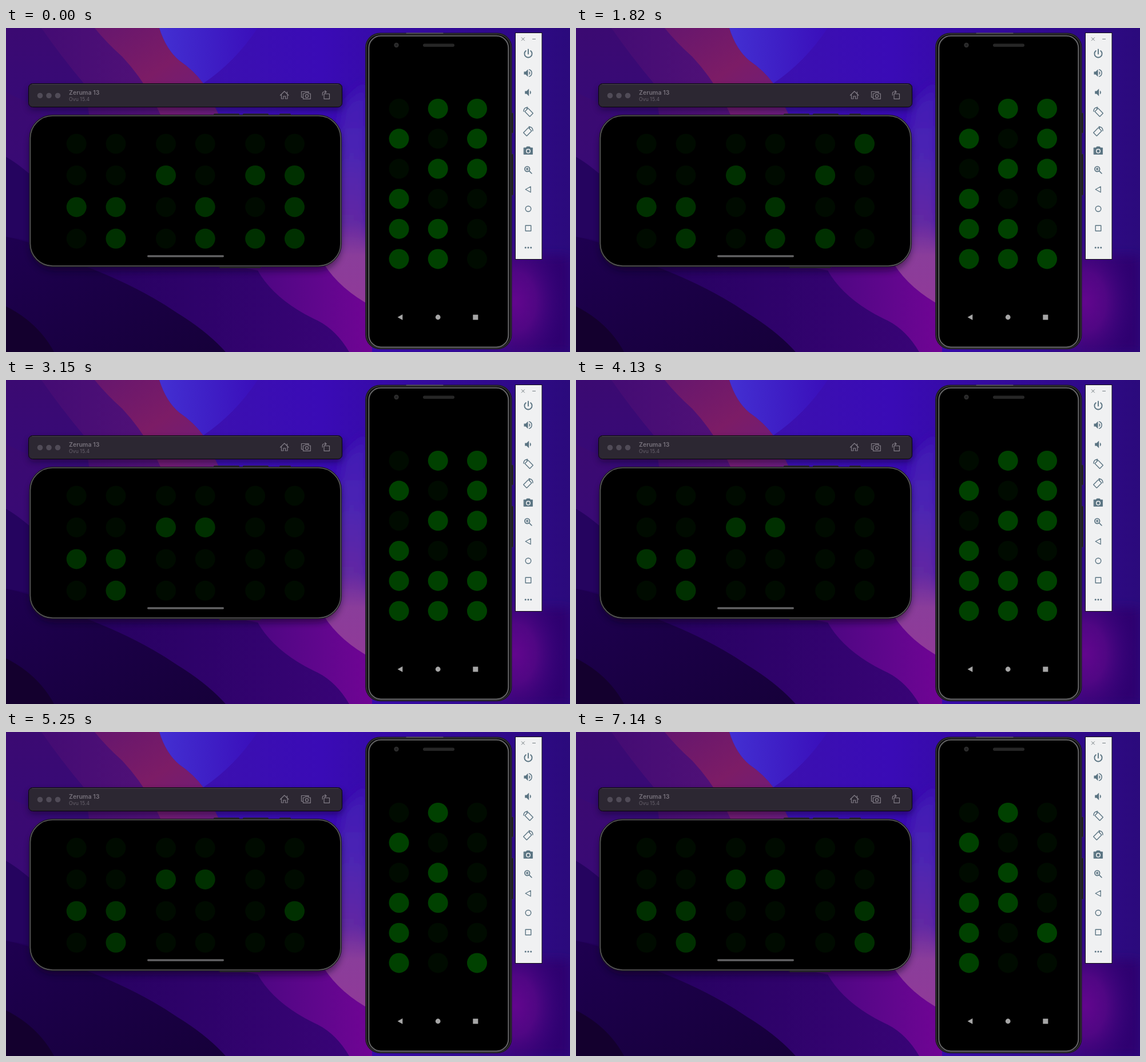
Recreate the animation shown at these times as an HTML page. Size 986 px wide and 568 px high, loop 7210 ms.

```html
<!DOCTYPE html>
<html lang="en">
<head>
<meta charset="utf-8">
<title>Binary clock on two phones</title>
<style>
  html, body { margin: 0; width: 100%; height: 100%; overflow: hidden; background: #21005a; }
  svg { display: block; width: 986px; height: 568px; }
  text { font-family: Inter, "Liberation Sans", sans-serif; }
  .line { fill: none; stroke-linecap: round; stroke-linejoin: round; }
</style>
</head>
<body>
<svg viewBox="0 0 986 568" xmlns="http://www.w3.org/2000/svg">
  <defs>
    <linearGradient id="sky">
      <stop offset="0" stop-color="#3a0a76"/>
      <stop offset=".3" stop-color="#3c12ae"/>
      <stop offset=".56" stop-color="#3a0bb6"/>
      <stop offset=".9" stop-color="#2f0988"/>
      <stop offset="1" stop-color="#2b0a7c"/>
    </linearGradient>
    <linearGradient id="plum">
      <stop offset="0" stop-color="#400a72"/>
      <stop offset="1" stop-color="#58147a"/>
    </linearGradient>
    <linearGradient id="rose" x1="0" y1="0" x2="1" y2="1">
      <stop offset="0" stop-color="#66166e"/>
      <stop offset=".5" stop-color="#7c1c66"/>
      <stop offset="1" stop-color="#6a1c80"/>
    </linearGradient>
    <linearGradient id="blue">
      <stop offset="0" stop-color="#4330d2"/>
      <stop offset="1" stop-color="#3a0eba"/>
    </linearGradient>
    <linearGradient id="left" x1="0" y1="0" x2="0" y2="1">
      <stop offset="0" stop-color="#3b0a72"/>
      <stop offset="1" stop-color="#360a78"/>
    </linearGradient>
    <linearGradient id="strip" x1="0" y1="0" x2="0" y2="1">
      <stop offset="0" stop-color="#3f16b4"/>
      <stop offset=".3" stop-color="#4a24b4"/>
      <stop offset=".65" stop-color="#6329a2"/>
      <stop offset="1" stop-color="#8c3f9a"/>
    </linearGradient>
    <linearGradient id="navy" x1="0" y1="0" x2="1" y2="1">
      <stop offset="0" stop-color="#1e0050"/>
      <stop offset="1" stop-color="#16003a"/>
    </linearGradient>
    <linearGradient id="low">
      <stop offset="0" stop-color="#21005a"/>
      <stop offset="1" stop-color="#3a0478"/>
    </linearGradient>
    <linearGradient id="magenta">
      <stop offset="0" stop-color="#42067c"/>
      <stop offset=".7" stop-color="#62068e"/>
      <stop offset="1" stop-color="#700494"/>
    </linearGradient>
    <linearGradient id="pink" x1="0" y1="0" x2="0" y2="1">
      <stop offset="0" stop-color="#7c359c" stop-opacity="0"/>
      <stop offset=".4" stop-color="#8a3d9a"/>
      <stop offset="1" stop-color="#903a98"/>
    </linearGradient>
    <radialGradient id="glow">
      <stop offset="0" stop-color="#62068e"/>
      <stop offset=".4" stop-color="#540786" stop-opacity=".9"/>
      <stop offset="1" stop-color="#34057a" stop-opacity="0"/>
    </radialGradient>
    <filter id="soft" x="-20%" y="-20%" width="140%" height="140%"><feGaussianBlur stdDeviation="9"/></filter>
    <filter id="shade" x="-20%" y="-40%" width="140%" height="180%"><feGaussianBlur stdDeviation="6"/></filter>
  </defs>

  <!-- wallpaper -->
  <rect width="986" height="568" fill="url(#sky)"/>
  <path d="M0 0H268L345 97L372 152V200H0Z" fill="url(#plum)"/>
  <path d="M0 0H62Q95 48 136 97L150 180H0Z" fill="url(#left)"/>
  <path d="M155 0H268Q280 38 303 57Q328 74 345 97L372 152H270Q245 95 203 50Q176 26 155 0Z" fill="url(#rose)"/>
  <path d="M268 0H440Q400 60 345 97Q328 74 303 57Q280 38 268 0Z" fill="url(#blue)"/>
  <path d="M0 112Q24 126 60 138V440H0Z" fill="url(#left)"/>
  <path d="M0 226Q22 238 60 272V440H0Z" fill="#25045f"/>
  <path d="M588 142Q606 112 632 96V480H540Z" fill="url(#strip)" filter="url(#soft)"/>
  <path d="M0 366Q80 376 150 418H640V568H0Z" fill="url(#low)"/>
  <path d="M372 412H640V568H600Q578 530 545 513Q470 478 440 425Z" fill="url(#magenta)"/>
  <path d="M540 340H640V488Q584 458 556 414Z" fill="url(#pink)"/>
  <path d="M880 400H986V568H880Z" fill="#2d0670" filter="url(#soft)"/>
  <ellipse cx="890" cy="480" rx="92" ry="130" fill="url(#glow)"/>
  <path d="M0 366Q70 380 134 416Q230 452 300 500Q352 532 384 568H0Z" fill="url(#navy)"/>
  <path d="M0 488Q56 516 84 568H0Z" fill="#14002e"/>

  <!-- landscape phone and its title bar -->
  <rect x="40" y="104" width="548" height="39" rx="8" fill="#08001c" opacity=".5" filter="url(#shade)"/>
  <rect x="42" y="162" width="544" height="264" rx="42" fill="#08001c" opacity=".5" filter="url(#shade)"/>
  <rect x="39.5" y="97.5" width="548" height="41" rx="7" fill="#2c2732" stroke="#08060c"/>
  <path d="M46 98.8H581" class="line" stroke="#48424e"/>
  <g fill="#504b57">
    <circle cx="59.5" cy="118.5" r="4.8"/><circle cx="75" cy="118.5" r="4.8"/><circle cx="90.5" cy="118.5" r="4.8"/>
  </g>
  <text x="110" y="117" font-size="10.6" font-weight="600" fill="#77727c">Zeruma 13</text>
  <text x="110" y="128.4" font-size="8.8" fill="#67626c">Ovu 15.4</text>
  <g class="line" stroke="#827d87" stroke-width="1.2">
    <path d="M479.5 118L486.7 111L494 118M481.5 117V124H485V119.5H488.5V124H492V117M491.5 112V115"/>
    <path d="M519 121.5H516.5V111.5H529V113.5M519.5 115H522L523.3 113.3H528L529.3 115H532.3V124.3H519.5Z"/>
    <circle cx="526" cy="119.3" r="2.6"/>
    <path d="M556 115.5H565.5V124.3H556ZM553.3 118V114.5Q553.3 112 556 112H560M557.5 109.8L560 112L557.5 114.2"/>
  </g>
  <g fill="#26252a">
    <rect x="363" y="150" width="45" height="4" rx="1.5"/><rect x="414" y="150" width="45" height="4" rx="1.5"/>
    <rect x="478" y="150" width="20" height="4" rx="1.5"/><rect x="373" y="417" width="72" height="4" rx="1.5"/>
  </g>
  <rect x="41.5" y="153" width="544.5" height="265" rx="40" fill="#000" stroke="#1c1b1d" stroke-width="2"/>
  <rect x="42.5" y="154" width="542.5" height="263" rx="39" fill="none" stroke="#58575a" stroke-width="1.6"/>
  <rect x="247" y="398.3" width="134" height="3.4" rx="1.7" fill="#626163"/>

  <!-- portrait phone -->
  <g fill="#1a191b" stroke="#39383b" stroke-width=".7">
    <rect x="882" y="149" width="4.5" height="35" rx="1"/><rect x="882" y="221" width="4.5" height="72" rx="1"/>
  </g>
  <rect x="628.8" y="9.2" width="255" height="553.3" rx="25" fill="#0a0a0b" stroke="#1e1e20" stroke-width="1.4"/>
  <rect x="630.2" y="10.6" width="252.2" height="550.5" rx="24" fill="none" stroke="#3c3c3e" stroke-width="1.2"/>
  <rect x="634.3" y="13.8" width="244" height="545.6" rx="21" fill="#000" stroke="#646466" stroke-width="2"/>
  <path d="M700 9H764" class="line" stroke="#68676b"/>
  <rect x="729" y="27.5" width="55" height="5.5" rx="2.7" fill="#262626"/>
  <circle cx="682.5" cy="30" r="4.2" fill="#2c2c2c"/><circle cx="682.5" cy="30" r="1.8" fill="#202022"/>
  <g fill="#a6a6a6">
    <path d="M684.5 507L693.3 502V512Z"/><circle cx="755.2" cy="507" r="4.4"/><rect x="816.3" y="502.6" width="9" height="9"/>
  </g>

  <!-- emulator controls -->
  <rect x="890.5" y="8.5" width="46.5" height="397" fill="#f0f1f2" stroke="#101014"/>
  <path d="M901.3 16.8l5.2 5.2m0-5.2l-5.2 5.2M920.6 19.4h5" class="line" stroke="#727b80"/>
  <g id="tools" class="line" stroke="#5a7482" stroke-width="1.5">
    <g><path d="M0-7.5V.5M-4.2-5A6.6 6.6 0 1 0 4.2-5" stroke-width="1.9"/></g>
    <g>
      <path d="M-7.5-2.4h3l4-4v12.8l-4-4h-3z" fill="#5a7482" stroke="none"/>
      <path d="M1.5-3.2a3.6 3.6 0 0 1 0 6.4z" fill="#5a7482" stroke="none"/>
      <path d="M1.8-6a6.3 6.3 0 0 1 0 12"/>
    </g>
    <g fill="#5a7482" stroke="none">
      <path d="M-5.8-2.4h3l4-4v12.8l-4-4h-3z"/><path d="M3-3.2a3.6 3.6 0 0 1 0 6.4z"/>
    </g>
    <g>
      <g id="turn" stroke-width="1.4">
        <rect x="-4.1" y="-6.2" width="8.2" height="12.4" rx=".5" transform="translate(1.2 1) rotate(-45)"/>
        <path d="M-8-.8Q-8-7.6-1.2-8M-1.2-8L-2.6-5.8"/>
      </g>
    </g>
    <g><use href="#turn" transform="scale(-1 1)"/></g>
    <g>
      <path d="M-7.6-5h3.6l1.5-2h5l1.5 2h3.6v11.5h-15.2z" fill="#5a7482" stroke-width=".8"/>
      <circle cy=".7" r="3.3" stroke="#f0f1f2" stroke-width="1.5"/>
    </g>
    <g><path d="M2.6-1.8A4.4 4.4 0 1 0-6.2-1.8A4.4 4.4 0 1 0 2.6-1.8M1.6 1.6L6 6M-3.7-1.8h3.8M-1.8-3.7v3.8" stroke-width="1.6"/></g>
    <g><path d="M4.2-5V5L-4.8 0Z" stroke-width="1.3"/></g>
    <g><circle r="4.8" stroke-width="1.4"/></g>
    <g><rect x="-4.8" y="-4.8" width="9.6" height="9.6" stroke-width="1.4"/></g>
    <g><path d="M-4.8 0h.01M0 0h.01M4.8 0h.01" stroke-width="3"/></g>
  </g>
  <g id="dots"></g>
</svg>
<script>
const LOOP = 7210, TICK = 1050;
const START = (23 * 60 + 43) * 60 + 56;
const dots = document.getElementById('dots');

[...document.getElementById('tools').children].forEach((icon, i) =>
  icon.setAttribute('transform', `translate(913 ${45 + i * 34})`));

function makeGrid(xs, ys) {
  return xs.map(x => ys.map(y => {
    const dot = document.createElementNS('http://www.w3.org/2000/svg', 'circle');
    dot.setAttribute('cx', x);
    dot.setAttribute('cy', y);
    dot.setAttribute('r', 17.5);
    return dots.appendChild(dot);
  }));
}

function showBits(column, value, on, off) {
  column.forEach((dot, row) => {
    const lit = value >> (column.length - 1 - row) & 1;
    dot.setAttribute('fill', lit ? on : off);
  });
}

const split = s => [Math.floor(s / 3600), Math.floor(s / 60) % 60, s % 60];
const digits = s => split(s).flatMap(n => [Math.floor(n / 10), n % 10]);

const wide = makeGrid([123.2, 192, 279.5, 348.2, 435.7, 504.5], [203, 258.4, 313.9, 369.3]);
const tall = makeGrid([687, 755.2, 823.5], [141.4, 194.1, 246.8, 299.5, 352.2, 404.9]);

// the landscape phone runs one second ahead of the portrait one
function draw(ms) {
  const now = START + Math.floor(ms % LOOP / TICK);
  digits(now + 1).forEach((n, i) => showBits(wide[i], n, '#003000', '#000b00'));
  split(now).forEach((n, i) => showBits(tall[i], n, '#004100', '#000b00'));
}

function frame() {
  draw(performance.now());
  requestAnimationFrame(frame);
}
frame();
</script>
</body>
</html>
```
